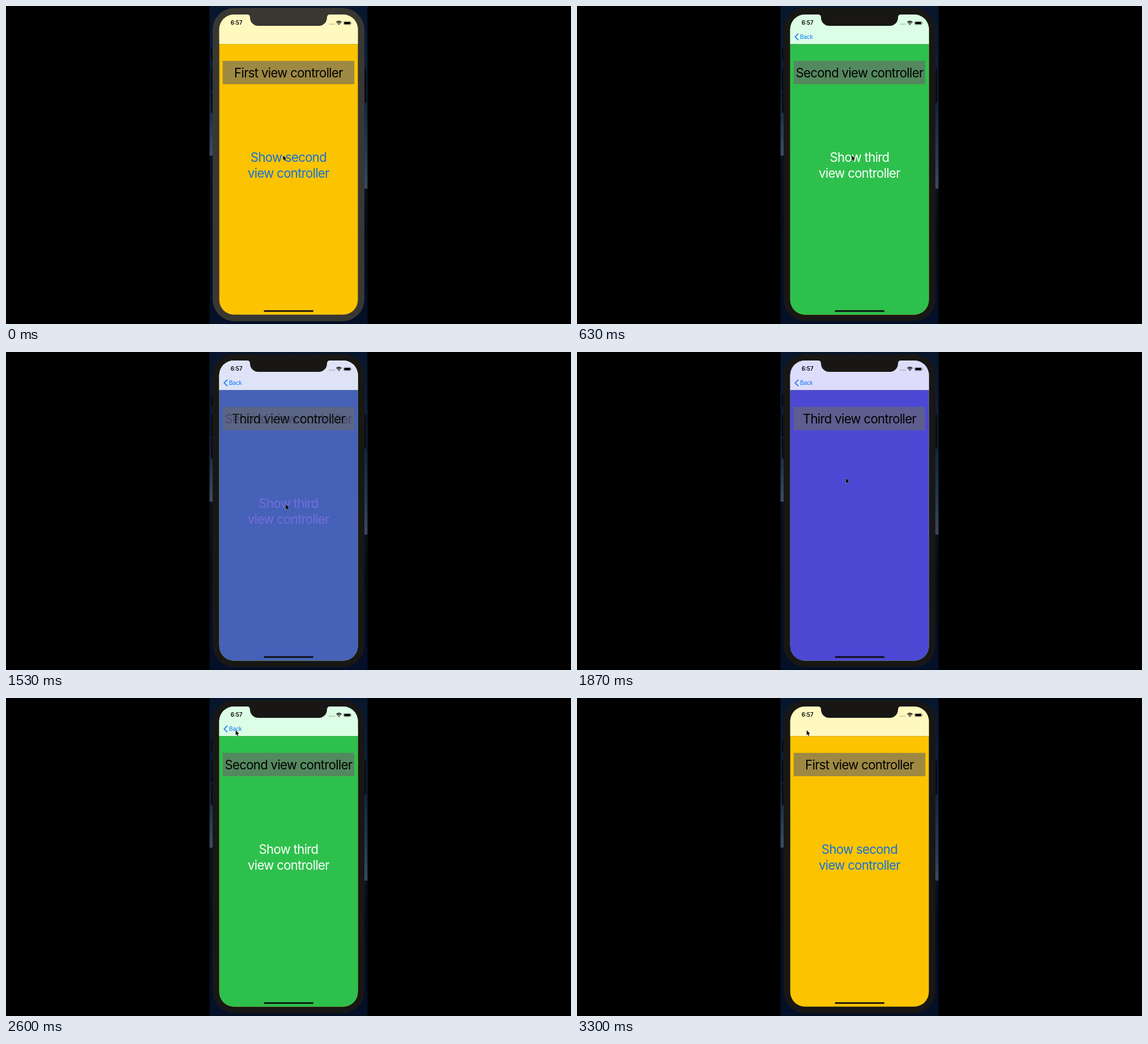
Write an HTML page that moves like this. It is 998 px wide and 561 px high and loops after 3.33 s.

```html
<!DOCTYPE html>
<html lang="en">
<head>
<meta charset="utf-8">
<title>View controller fade</title>
<style>
  html, body { margin: 0; width: 100%; height: 100%; overflow: hidden; background: #000; }
  svg { display: block; }
  text { font-family: Inter, Roboto, sans-serif; font-optical-sizing: none; }
  .big { font-size: 22.2px; letter-spacing: -.7px; text-anchor: middle; }
</style>
</head>
<body>
<svg width="998" height="561" viewBox="0 0 998 561">
  <defs>
    <linearGradient id="left" x1="0" y1="0" x2="0" y2="1">
      <stop offset="0" stop-color="#07162c"/>
      <stop offset=".25" stop-color="#0c1e38"/>
      <stop offset=".34" stop-color="#1d2f4a"/>
      <stop offset=".47" stop-color="#3b4c66"/>
      <stop offset=".472" stop-color="#0a111c"/>
      <stop offset=".7" stop-color="#070d18"/>
      <stop offset="1" stop-color="#04102a"/>
    </linearGradient>
    <linearGradient id="right" x1="0" y1="0" x2="0" y2="1">
      <stop offset="0" stop-color="#07162c"/>
      <stop offset=".3" stop-color="#12243e"/>
      <stop offset=".5" stop-color="#2c3d54"/>
      <stop offset=".573" stop-color="#3a4b60"/>
      <stop offset=".576" stop-color="#0b121c"/>
      <stop offset=".7" stop-color="#060b14"/>
      <stop offset="1" stop-color="#04102a"/>
    </linearGradient>
    <clipPath id="glass"><rect x="376.7" y="15" width="244.8" height="529.6" rx="26"/></clipPath>
  </defs>

  <rect width="998" height="561"/>
  <rect x="359.5" width="140" height="560.5" fill="url(#left)"/>
  <rect x="499" width="139.5" height="560.5" fill="url(#right)"/>
  <g fill="#0b0f18" stroke="#030508" stroke-width=".8">
    <rect x="362.5" y="75" width="4" height="20" rx="1"/>
    <rect x="362.5" y="111" width="4" height="38" rx="1"/>
    <rect x="362.5" y="152" width="4" height="36" rx="1"/>
    <rect x="632" y="111" width="4" height="59" rx="1"/>
  </g>
  <rect id="body" x="365" y="3.5" width="268" height="552.5" rx="38"/>

  <g clip-path="url(#glass)">
    <g id="screens"></g>
    <g id="back">
      <path d="M391 48.8L385.3 54.5L391 60.2" fill="none" stroke="#1279fb" stroke-width="1.7"/>
      <text x="393.8" y="58.2" font-size="10.4" letter-spacing="-.35" fill="#1279fb">Back</text>
    </g>
    <text x="396.7" y="33.4" font-size="9.7" font-weight="600">6:57</text>
    <g fill="#000" fill-opacity=".35">
      <circle cx="571.2" cy="32" r=".9"/><circle cx="574" cy="32" r=".9"/>
      <circle cx="576.8" cy="32" r=".9"/><circle cx="579.6" cy="32" r=".9"/>
    </g>
    <g fill="none" stroke="#000" stroke-width="1.4">
      <path d="M583.4 28.7Q588 24.6 592.6 28.7"/>
      <path d="M585.1 30.5Q588 28 590.9 30.5"/>
    </g>
    <path d="M586.4 31.9Q588 30.6 589.6 31.9L588 33.5Z"/>
    <rect x="596.3" y="27" width="13" height="6.2" rx="1.9" fill="none" stroke="#000" stroke-opacity=".4" stroke-width=".7"/>
    <rect x="597.3" y="28" width="11" height="4.2" rx="1"/>
    <path d="M610.2 29v2.2q1-.3 1-1.1t-1-1.1" fill-opacity=".45"/>
    <rect x="455.5" y="536.8" width="87.5" height="2.8" rx="1.4" fill="#0a0a0a"/>
  </g>
  <path id="notch" d="M426 14H572V15Q567 15 567 20.5A14.5 14.5 0 0 1 552.5 35H445.5A14.5 14.5 0 0 1 431 20.5Q431 15 426 15Z"/>
  <path id="cursor" d="M0 0V8.4L1.9 6.7L3.2 9.7L4.7 9L3.4 6.1H6Z" stroke="#fff" stroke-opacity=".8" stroke-width=".7" paint-order="stroke"/>
</svg>
<script>
const LOOP = 3330;
const $ = id => document.getElementById(id);

const views = [
  { name: 'First', next: 'second', fill: '#fcc400', bar: '#fff9c0', ink: '#1470d8' },
  { name: 'Second', next: 'third', fill: '#2ec04c', bar: '#dcfde6', ink: '#fff' },
  { name: 'Third', fill: '#4c48d4', bar: '#dedcfb' }
];

const button = v => v.next ? `
  <g class="big" fill="${v.ink}">
    <text x="499" y="275">Show ${v.next}</text>
    <text x="499" y="303">view controller</text>
  </g>` : '';

$('screens').innerHTML = views.map(v => `
  <g>
    <rect x="376" y="14" width="246" height="532" fill="${v.fill}"/>
    <rect x="376" y="14" width="246" height="53.2" fill="${v.bar}"/>
    <rect x="376" y="67" width="246" height=".5" fill-opacity=".3"/>
    <rect x="382.7" y="96.8" width="232.6" height="41.2" fill="#696969" fill-opacity=".64"/>
    <text class="big" x="499" y="126">${v.name} view controller</text>
    ${button(v)}
  </g>`).join('');
const layers = $('screens').children;

const ramp = (t, a, b) => {
  const x = Math.min(1, Math.max(0, (t - a) / (b - a)));
  return x * x * (3 - 2 * x);
};

// Cursor stops: time, x, y
const stops = [
  [0, 489.5, 263.5], [200, 489.5, 263.5], [400, 485.3, 263.5], [650, 485.3, 263.5],
  [1000, 494.3, 269], [1720, 494.3, 269], [2220, 405.7, 57], [LOOP, 405.7, 57]
];

function cursorAt(t) {
  const i = stops.findIndex(s => s[0] > t);
  const [t0, x0, y0] = stops[i - 1], [t1, x1, y1] = stops[i];
  const k = ramp(t, t0, t1);
  return [x0 + (x1 - x0) * k, y0 + (y1 - y0) * k];
}

function draw(t) {
  const second = ramp(t, 310, 518) - ramp(t, 3050, 3250);
  const third = ramp(t, 1390, 1590) - ramp(t, 2390, 2590);
  layers[1].setAttribute('opacity', second);
  layers[2].setAttribute('opacity', third);

  const press = ramp(t, 2320, 2340) - ramp(t, 2400, 2500) + ramp(t, 2990, 3010);
  $('back').setAttribute('opacity', Math.min(1, second * 1.4) * (1 - .75 * press));

  const shell = t < 30 ? '#393732' : '#181715';
  $('body').setAttribute('fill', shell);
  $('notch').setAttribute('fill', shell);
  $('cursor').setAttribute('transform', `translate(${cursorAt(t)})`);
}

const start = performance.now();
function tick() {
  draw((performance.now() - start) % LOOP);
  requestAnimationFrame(tick);
}
tick();
</script>
</body>
</html>
```
